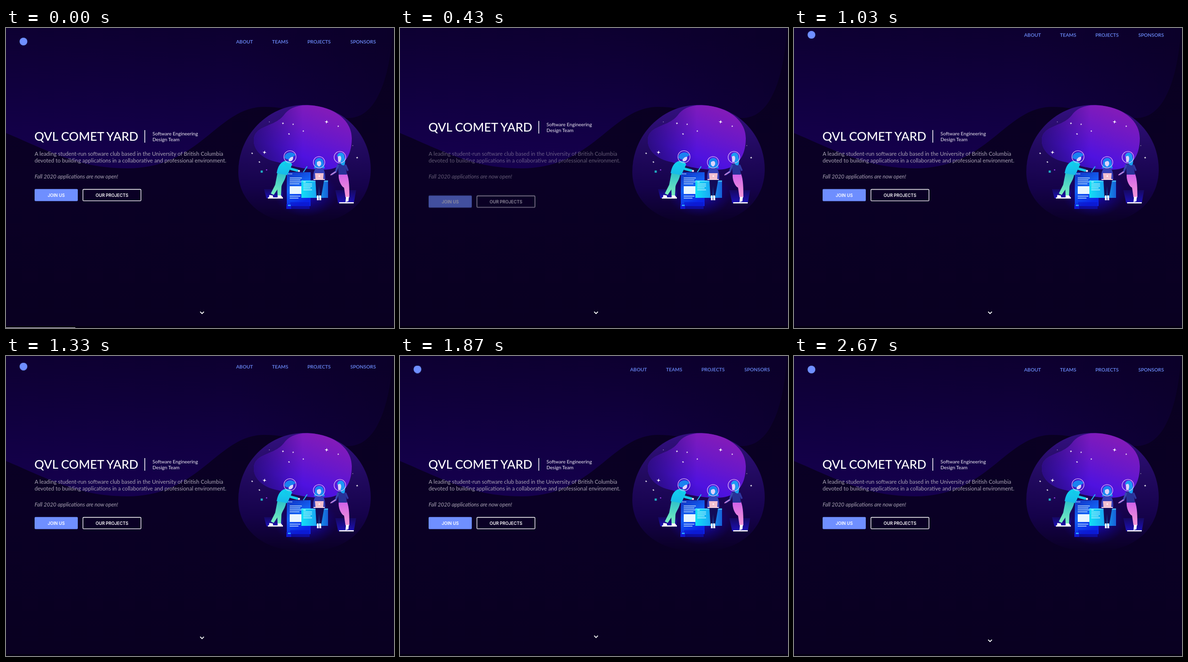
These frames come from a looping animation (800x620 px, 2710 ms). An HTML page:

```html
<!DOCTYPE html>
<html lang="en">
<head>
<meta charset="utf-8">
<title>Student club landing page</title>
<style>
  html, body { margin: 0; width: 100%; height: 100%; overflow: hidden; background: #090022; }
  svg { display: block; width: 800px; height: 620px; }
  text { font-family: Lato, sans-serif; }
  .nav { font-size: 10px; font-weight: 600; fill: #6f8fff; }
  .title { font-size: 25px; font-weight: 500; fill: #fff; }
  .tag { font-size: 10px; fill: #eeecf4; }
  .copy { font-size: 11.25px; fill: #aaa5b5; }
  .label { font: 600 8.75px Inter, sans-serif; fill: #fff; }
</style>
</head>
<body>
<svg viewBox="0 0 800 620">
  <defs>
    <linearGradient id="page" x2="0" y2="1">
      <stop stop-color="#09001f"/><stop offset=".5" stop-color="#0a0025"/><stop offset="1" stop-color="#090021"/>
    </linearGradient>
    <linearGradient id="wave" x1=".5" y1="0" x2=".35" y2="1">
      <stop stop-color="#0d0030"/><stop offset=".6" stop-color="#110042"/><stop offset="1" stop-color="#15004e"/>
    </linearGradient>
    <linearGradient id="waveFade">
      <stop offset=".6" stop-color="#090022" stop-opacity="0"/><stop offset="1" stop-color="#090022" stop-opacity=".5"/>
    </linearGradient>
    <linearGradient id="dome" x2="0" y2="1">
      <stop stop-color="#33107f"/><stop offset=".35" stop-color="#220a60"/>
      <stop offset=".7" stop-color="#15024a"/><stop offset="1" stop-color="#0a0025"/>
    </linearGradient>
    <linearGradient id="planet" x1=".85" y1="0" x2=".3" y2="1">
      <stop stop-color="#8a1cb4"/><stop offset=".4" stop-color="#6c18c8"/>
      <stop offset=".75" stop-color="#4f12e0"/><stop offset="1" stop-color="#3a0fc0"/>
    </linearGradient>
    <linearGradient id="planetShade">
      <stop stop-color="#220a66" stop-opacity=".75"/><stop offset=".5" stop-color="#220a66" stop-opacity="0"/>
    </linearGradient>
    <radialGradient id="glow">
      <stop stop-color="#1b10ff" stop-opacity=".75"/><stop offset="1" stop-color="#1405b0" stop-opacity="0"/>
    </radialGradient>
    <linearGradient id="board" x2=".4" y2="1">
      <stop stop-color="#1230c0"/><stop offset=".5" stop-color="#1263f5"/><stop offset="1" stop-color="#0a24e8"/>
    </linearGradient>
    <linearGradient id="card">
      <stop stop-color="#12e0f5"/><stop offset=".5" stop-color="#18aef5"/><stop offset="1" stop-color="#1660d8"/>
    </linearGradient>
    <linearGradient id="shirt" x2="0" y2="1"><stop stop-color="#10d4f0"/><stop offset="1" stop-color="#18b8e8"/></linearGradient>
    <linearGradient id="jeans" x2="0" y2="1"><stop stop-color="#2cc0c8"/><stop offset="1" stop-color="#7df0c0"/></linearGradient>
    <linearGradient id="slacks" x2="0" y2="1"><stop stop-color="#d060e8"/><stop offset="1" stop-color="#f59ad8"/></linearGradient>
    <linearGradient id="pot" x2="0" y2="1"><stop stop-color="#160860"/><stop offset="1" stop-color="#1c10b8"/></linearGradient>
  </defs>

  <rect width="800" height="620" fill="url(#page)"/>
  <g id="wavePair">
    <path id="hill" fill="url(#wave)" d="M0 0H798C793 85 770 186 706 186C640 186 590 162 530 163C435 165 400 290 250 290C150 290 90 255 0 217Z"/>
    <path fill="url(#waveFade)" d="M0 0H798C793 85 770 186 706 186C640 186 590 162 530 163C435 165 400 290 250 290C150 290 90 255 0 217Z"/>
  </g>
  <rect y="616" width="800" height="4" fill="#050012"/>
  <rect id="status" y="619" width="143" height="1" fill="#e4e2ea"/>

  <g id="scene">
    <path fill="url(#dome)" d="M615 159C695 159 752 220 752 292C752 355 705 404 618 404C525 404 479 355 479 297C479 222 540 159 615 159Z"/>
    <path id="orb" fill="url(#planet)" d="M622 159.500C672 161 713 188 713 228C713 266 695 293 654 293C610 293 585 283 555 276C526 269 511 251 511 233C511 200 553 206 573 180C582 167 598 159 622 159.500Z"/>
    <path fill="url(#planetShade)" d="M622 159.500C672 161 713 188 713 228C713 266 695 293 654 293C610 293 585 283 555 276C526 269 511 251 511 233C511 200 553 206 573 180C582 167 598 159 622 159.500Z"/>
    <g id="stars" fill="#fff"></g>
    <rect x="525" y="294.500" width="4.500" height="4.500" fill="#22a8c0"/>
    <rect x="536" y="292" width="2.500" height="2.500" fill="#8a3ad8"/>

    <ellipse cx="618" cy="342" rx="66" ry="48" fill="url(#glow)"/>
    <path fill="url(#pot)" d="M532 333H573L569 352H537Z"/>
    <path fill="url(#pot)" d="M679 335H722L717 362H685Z"/>

    <rect x="579" y="298" width="49" height="70" fill="url(#board)"/>
    <rect x="586" y="360" width="40" height="14" fill="#0c14c8" opacity=".6"/>
    <rect x="578" y="364" width="10" height="10" fill="#1018d0"/>
    <rect x="581" y="365" width="6" height="3" fill="#28a0ff"/>
    <rect x="585" y="327" width="24" height="16" fill="#e9f6ff"/>
    <g id="boardLines" stroke="#d8f0ff" stroke-width="1.300"></g>
    <rect x="609" y="315" width="55" height="36" fill="url(#card)"/>
    <path d="M609 315h55v3h-55z" fill="#60eaff" opacity=".55"/>
    <g id="cardLines" stroke="#dcfaff" stroke-width="1.200"></g>

    <!-- leaning figure -->
    <path fill="url(#jeans)" d="M560 298L574 301C576 312 566 318 564 327L552 345L546 342L555 324Z"/>
    <path fill="url(#jeans)" d="M566 299L578 301C577 313 569 321 568 328L567 347H560L559 326Z"/>
    <path fill="url(#shirt)" d="M572 276C578 273 587 275 590 282L580 304L558 300C560 288 564 280 572 276Z"/>
    <path fill="none" stroke="#14c8e8" stroke-width="5" stroke-linejoin="round" d="M575 280L587 291L602 295"/>
    <circle cx="604" cy="295.500" r="2.200" fill="#f4e0f4"/>
    <path fill="#f4e8ff" d="M582 265L592 266C593 272 589 277 583 275Z"/>
    <path fill="#1589ee" d="M574 268C574 257 590 253 597 262C593 268 589 265 586 268C583 273 578 272 574 268Z"/>
    <circle class="helmet" cx="585.500" cy="266" r="12.500"/>
    <path fill="#fff" d="M543 345l7 1 1 5h-9zM560 346h7l4 5h-11zM540 350h31v2.500h-31z"/>
    <path fill="#1a2ba0" d="M600 297.500h14v1.800h-14z"/>
    <path fill="none" stroke="#22b4ee" stroke-width="2" d="M613 298L621 286"/>

    <!-- sitting figure -->
    <path fill="#1590f0" d="M637 280C635 266 655 264 655 279L657 290H635Z"/>
    <path fill="#f2e4fa" d="M641 274Q650 272 650 281Q646 291 641 282Z"/>
    <path fill="#1589ee" d="M639 279C640 265 654 269 652 279Q647 271 639 279Z"/>
    <path fill="#3540b8" d="M640 289H652C657 293 659 303 658 316H634C632 302 635 293 640 289Z"/>
    <path fill="#120c58" d="M638 314H656L650 348H646L645 326L645 348H640Z"/>
    <path fill="#f2bfd0" d="M637 300h18l-1 12h-16z"/>
    <circle cx="646" cy="306" r="1.500" fill="#fff"/>
    <path fill="#f5d0dc" d="M634 312h23v2h-23z"/>
    <path fill="#fff" d="M641 346h3.500l.5 10h-4zM646 346h3.500l.5 10h-4z"/>
    <circle class="helmet" cx="645.500" cy="277.500" r="11.800"/>

    <!-- standing figure -->
    <path fill="url(#slacks)" d="M686 301H703C708 313 708 332 708 350H700L697 330L694 328C688 321 685 311 686 301Z"/>
    <path fill="#283298" d="M684 281Q692 276 700 282L703 303H686Z"/>
    <path fill="none" stroke="#3846b0" stroke-width="4" d="M685 283L680 297L671 303"/>
    <path fill="none" stroke="#df8be0" stroke-width="2" d="M680 297L669 304"/>
    <path fill="none" stroke="#3038a0" stroke-width="3.500" d="M700 283L705 295"/>
    <path fill="#f2e4fa" d="M684 264Q690 260 692 268L690 277H685Z"/>
    <path fill="#18a4f2" d="M683 266C682 255 698 254 698 267Q701 278 697 284Q689 284 690 276Q693 268 689 264Z"/>
    <circle class="helmet" cx="688.500" cy="267" r="12"/>
    <path fill="#fff" d="M701 349h6l-1 9-6 2zM687 360h30v2.500h-30z"/>
  </g>

  <g id="header">
    <circle cx="36" cy="28" r="8" fill="#6f8fff"/>
    <text class="nav" x="474.500" y="31.500">ABOUT</text>
    <text class="nav" x="548.500" y="31.500">TEAMS</text>
    <text class="nav" x="621.500" y="31.500">PROJECTS</text>
    <text class="nav" x="710" y="31.500">SPONSORS</text>
  </g>

  <g id="heading">
    <text class="title" x="58.500" y="233">QVL COMET YARD</text>
    <rect x="285.500" y="211" width="1.500" height="26" fill="#fff"/>
    <text class="tag" x="302" y="222">Software Engineering</text>
    <text class="tag" x="302" y="233.700">Design Team</text>
  </g>

  <g id="copy">
    <text class="copy" x="59" y="264">A leading student-run software club based in the University of British Columbia</text>
    <text class="copy" x="59" y="277.500">devoted to building applications in a collaborative and professional environment.</text>
    <text class="copy" x="59" y="311" font-style="italic">Fall 2020 applications are now open!</text>
  </g>

  <g id="buttons">
    <rect x="59" y="332.800" width="89" height="25" rx="1.800" fill="#6f8fff"/>
    <text class="label" x="103.500" y="348.500" text-anchor="middle">JOIN US</text>
    <rect x="158.600" y="333.500" width="119.700" height="23.700" rx="1.500" fill="none" stroke="#fff" stroke-width="1.300"/>
    <text class="label" x="218.500" y="348.500" text-anchor="middle">OUR PROJECTS</text>
  </g>

  <path id="chevron" fill="none" stroke="#fff" stroke-width="1.700" d="M400.300 586.300L404.200 590.200L408.100 586.300"/>
</svg>
<script>
  const LOOP = 2710, START = 107;
  const $ = id => document.getElementById(id);
  const endless = { duration: LOOP, iterations: Infinity };

  // Each step: [progress, y, opacity, easing]
  function play(id, delay, ms, steps) {
    const pose = (time, y, opacity, easing = 'linear') =>
      ({ offset: time / LOOP, transform: `translateY(${y}px)`, opacity, easing });
    const begin = START + delay;
    $(id).animate([
      pose(0, 0, 1),
      pose(begin, 0, 1),
      ...steps.map(([p, ...rest]) => pose(begin + p * ms, ...rest)),
      pose(LOOP, 0, 1)
    ], endless);
  }
  const enter = (id, ms, y, opacity) =>
    play(id, 0, ms, [[0, y, opacity, 'ease'], [1, 0, 1]]);

  enter('header', 2000, -58.5, 1);
  enter('heading', 1000, -43, 1);
  enter('copy', 1000, 0, 0);
  enter('buttons', 1000, 30.5, 0);

  const land = 'cubic-bezier(.215,.61,.355,1)';
  const drop = 'cubic-bezier(.755,.05,.855,.06)';
  play('chevron', 1000, 1000, [
    [.2, 0, 1, land], [.4, -18.75, 1, drop], [.43, -18.75, 1, drop],
    [.53, 0, 1, land], [.7, -9.4, 1, drop], [.8, 0, 1, land],
    [.9, -2.5, 1, drop], [1, 0, 1]
  ]);

  $('status').animate([
    { opacity: 1, offset: 0, easing: 'step-end' },
    { opacity: 0, offset: 30 / LOOP },
    { opacity: 0, offset: 1 }
  ], endless);

  function add(parent, tag, attrs) {
    const el = document.createElementNS('http://www.w3.org/2000/svg', tag);
    for (const name in attrs) el.setAttribute(name, attrs[name]);
    $(parent).append(el);
  }

  const stars = [
    [571, 197, 2.6], [592, 199, 2.2], [583.5, 219, 2.4], [613, 213, 2.2], [661, 194, 4.2],
    [685, 203, 2.2], [533, 257, 4.2], [507.5, 259, 2.4], [522.5, 277, 2.4], [724, 268, 2.6],
    [715, 243, 1.1], [543, 194, 1.1]
  ];
  for (const [x, y, r] of stars) {
    const q = r * .22;
    add('stars', 'path', {
      d: `M0 ${-r}L${q} ${-q}L${r} 0L${q} ${q}L0 ${r}L${-q} ${q}L${-r} 0L${-q} ${-q}Z`,
      transform: `translate(${x} ${y}) rotate(12)`
    });
    add('stars', 'circle', { cx: x, cy: y, r: r * .3 });
  }

  const rule = (parent, x, y, width) => add(parent, 'path', { d: `M${x} ${y}h${width}` });
  [2, 2, 2].forEach((w, i) => rule('boardLines', 582 + i * 3, 301.5, w));
  [25, 22, 25, 20].forEach((w, i) => rule('boardLines', 585, 310 + i * 4, w));
  [22, 18].forEach((w, i) => rule('boardLines', 585, 347.5 + i * 4, w));
  [5, 18, 18, 15, 18].forEach((w, i) => rule('cardLines', 613, 318.5 + i * 4, w));

  for (const ring of document.querySelectorAll('.helmet')) {
    ring.setAttribute('fill', '#4a50ff');
    ring.setAttribute('fill-opacity', '.12');
    ring.setAttribute('stroke', '#ecc8f8');
    ring.setAttribute('stroke-width', '1.1');
  }
</script>
</body>
</html>
```
